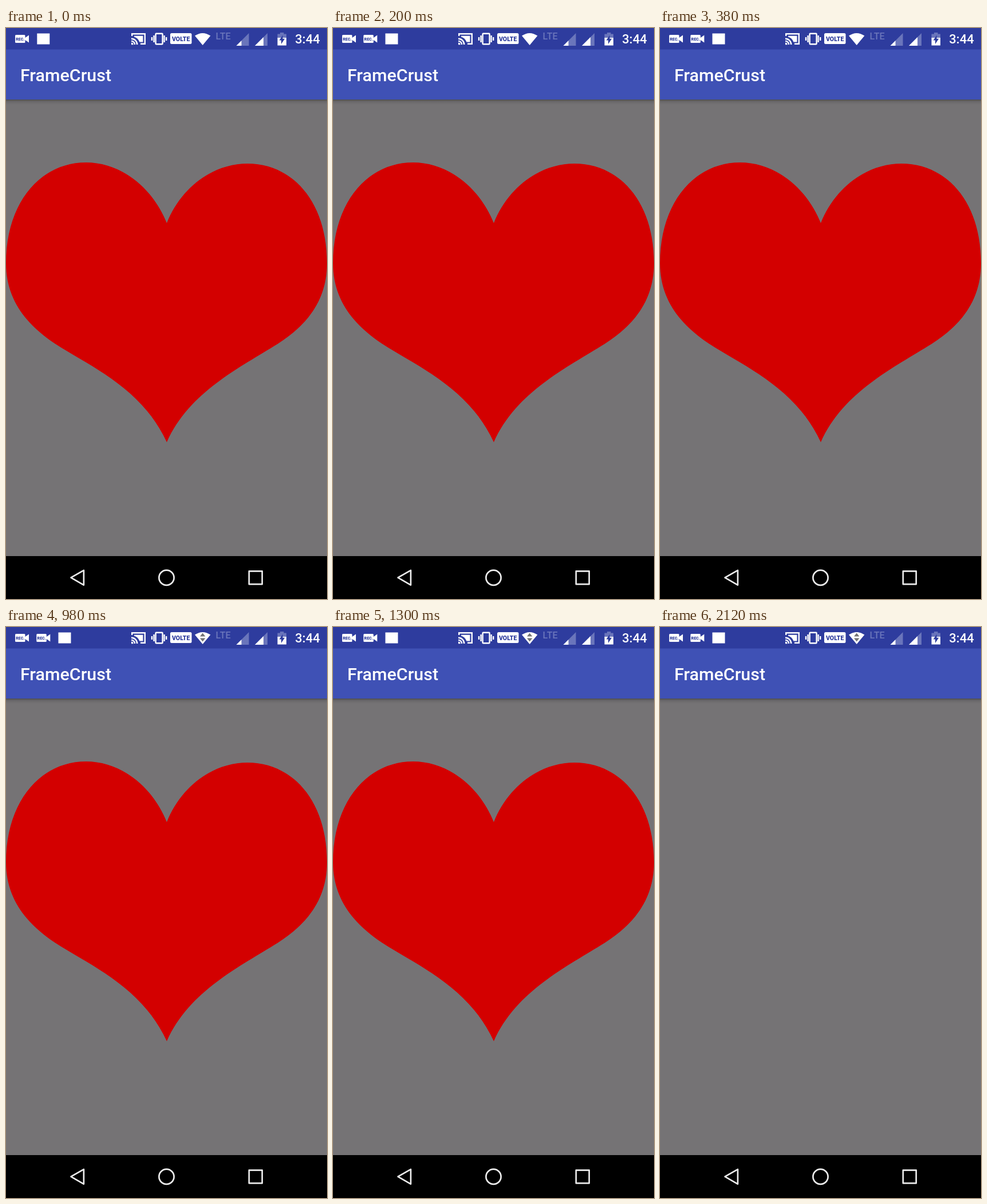
These frames come from a looping animation (561 px wide and 998 px high, 2.6 s). An HTML page:

```html
<!DOCTYPE html>
<html lang="en">
<head>
<meta charset="utf-8">
<title>Heart toast</title>
<style>
  html, body { margin: 0; width: 100%; height: 100%; overflow: hidden; background: #757375; }
  svg { display: block; width: 100%; height: 100%; }
  text { font-family: Roboto, sans-serif; font-weight: 500; }
  .dim { fill: #6a75bb; }
  .bar { fill: #2e3c9e; }
</style>
</head>
<body>
<svg viewBox="0 0 561 998" fill="#fff">
  <defs>
    <linearGradient id="shade" x2="0" y2="1">
      <stop offset="0" stop-color="#000" stop-opacity=".32"/>
      <stop offset=".4" stop-color="#000" stop-opacity=".1"/>
      <stop offset="1" stop-color="#000" stop-opacity="0"/>
    </linearGradient>
    <g id="rec">
      <path d="M17.5 12H32Q33.5 12 33.5 13.5V17L40 12.5V25.5L33.5 21V24.5Q33.5 26 32 26H17.5Q16 26 16 24.5V13.5Q16 12 17.5 12Z"/>
      <text class="bar" x="17.3" y="21.8" font-size="7" style="font-weight:900">REC.</text>
    </g>
    <path id="signal" d="M0 31L22 9V31Z"/>
  </defs>

  <rect width="561" height="998" fill="#757375"/>
  <path id="heart" fill="#d30000" d="M281 341C255 277 200 235 140 235C60 235 0 305 0 411C0 477 38 520 86 552C150 593 238 630 281 724C320 636 410 593 475 552C523 521 561 479 561 411C561 305 502 237 422 237C362 237 306 278 281 341Z"/>

  <rect y="125" width="561" height="9" fill="url(#shade)"/>
  <rect y="37" width="561" height="88" fill="#3f51b5"/>
  <rect class="bar" width="561" height="37.5"/>
  <text x="25" y="93" font-size="30.4">FrameCrust</text>

  <use href="#rec"/>
  <use id="rec2" href="#rec" x="37.3"/>
  <rect id="badge" x="91.5" y="9.5" width="22" height="19"/>

  <g fill="none" stroke="#fff" stroke-width="2.4">
    <path d="M220.2 14V10.2H242.8V27.8H235"/>
    <path d="M219 18.8A10 10 0 0 1 229.2 29M219 22.9A6 6 0 0 1 225.1 29"/>
    <rect x="261.6" y="9.8" width="12" height="18.4" rx="1"/>
    <path d="M258.6 13V25M255 16V22M276.6 13V25M280.2 16V22"/>
  </g>
  <path d="M219 25.6A3.6 3.6 0 0 1 222.6 29.2H219ZM224 13.8H239.4V24.4H233.4Q230.5 17.4 224 15.6Z"/>

  <rect x="287" y="9" width="37.5" height="19" rx="2.5"/>
  <text class="bar" x="305.7" y="22.5" font-size="10.6" text-anchor="middle" style="font-weight:900">VOLTE</text>

  <path d="M343.7 30L330 13.6Q343.7 4.2 357.4 13.6Z"/>
  <path id="arrows" fill="#747474" d="M339 16.5L343.7 10.5L348.4 16.5ZM339 19.5H348.4L343.7 25.5Z"/>

  <text class="dim" x="366.5" y="20" font-size="16.2">LTE</text>
  <use href="#signal" class="dim" x="402.5"/>
  <path d="M402.5 31L411.5 22V31Z"/>
  <use href="#signal" class="dim" x="435"/>
  <path d="M435 31L450 16V31Z"/>

  <path class="dim" d="M474.5 10.5H479V8H485.5V10.5H490V18H474.5Z"/>
  <path d="M474.5 17H490V30.5H474.5Z"/>
  <path class="bar" d="M483.6 12.5V18.7H487.2L481 28V21.5H477.6Z"/>
  <text x="505.3" y="27.3" font-size="22">3:44</text>

  <rect y="923" width="561" height="75" fill="#000"/>
  <g fill="none" stroke="#ececec" stroke-width="2.7" stroke-linejoin="round">
    <path d="M113.5 960.7L135.9 947.8V973.6Z"/>
    <circle cx="280.5" cy="960.8" r="13.1"/>
    <rect x="424.8" y="949.3" width="22.9" height="22.9"/>
  </g>
</svg>
<script>
  const LOOP = 2600;
  const get = id => document.getElementById(id);
  const [heart, rec2, badge, arrows] = ["heart", "rec2", "badge", "arrows"].map(get);
  const show = (el, on) => el.setAttribute("visibility", on ? "visible" : "hidden");

  function draw(t) {
    const second = t >= 100;
    show(rec2, second);
    badge.setAttribute("x", second ? 91.5 : 54.3);
    show(arrows, t >= 500);
    show(heart, t < 1400);
  }

  const start = performance.now();
  function tick() {
    draw((performance.now() - start) % LOOP);
    requestAnimationFrame(tick);
  }
  tick();
</script>
</body>
</html>
```
